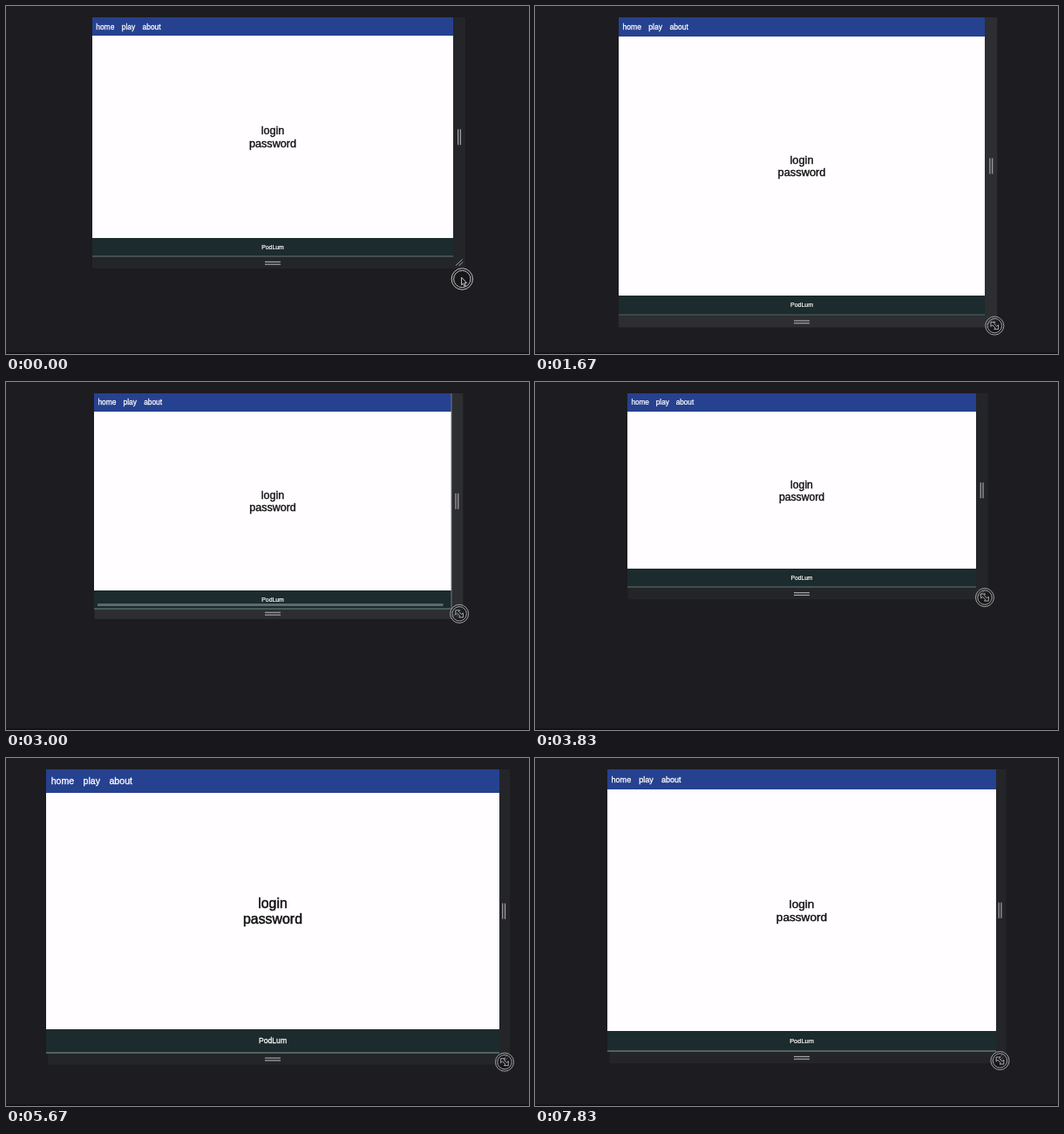
An HTML page with a canvas that plays this animation: 600x399 px, repeating every 8 s.

```html
<!DOCTYPE html>
<html lang="en">
<head>
<meta charset="utf-8">
<title>Responsive layout</title>
<style>
  html, body { margin: 0; width: 100%; height: 100%; overflow: hidden; background: #1d1c20; }
  canvas { display: block; }
</style>
</head>
<body>
<canvas id="stage" width="600" height="399"></canvas>
<script>
const ctx = document.getElementById('stage').getContext('2d');

const LOOP = 8000;
const STEP = 1000 / 6;
const CENTER = 306;
const TOP = 13;
const BAR = 14;
const FRAME_LEAD = 0.15;   // the frame and the pointer run ahead of the page, in steps
const POINTER_LEAD = 0.36;

const swing = p => (1 - Math.cos(Math.PI * p)) / 2;
const snap = p => 1 - (1 - p) ** 3;

// Turning points of the drag: [step, value, easing towards it]
const WIDTH = [
  [8.5, 414], [12.5, 432], [21.4, 399], [28.4, 401], [32, 528, snap],
  [33.1, 528], [38.2, 412], [44, 516], [49.3, 400]
];
const BOTTOM = [[4, 287], [11, 357], [21, 235], [23, 235], [28.6, 338], [48, 336]];

function follow(track, step) {
  const i = track.findIndex(k => k[0] > step);
  if (i === 0) return track[0][1];
  if (i < 0) return track[track.length - 1][1];
  const [s0, v0] = track[i - 1];
  const [s1, v1, ease = swing] = track[i];
  return v0 + (v1 - v0) * ease((step - s0) / (s1 - s0));
}

function sizeAt(step) {
  const width = follow(WIDTH, step);
  return { width, left: CENTER - width / 2, right: CENTER + width / 2, bottom: follow(BOTTOM, step) };
}

function box(x0, y0, x1, y1, color) {
  ctx.fillStyle = color;
  ctx.fillRect(x0, y0, x1 - x0, y1 - y0);
}

function line(x0, y0, x1, y1, color, weight = 1) {
  ctx.strokeStyle = color;
  ctx.lineWidth = weight;
  ctx.beginPath();
  ctx.moveTo(x0, y0);
  ctx.lineTo(x1, y1);
  ctx.stroke();
}

// A hairline stroke gives the text its slightly heavier rendering.
function text(str, x, middle, size, color, align = 'center') {
  ctx.font = `${size}px "Liberation Sans", Arial, sans-serif`;
  ctx.textAlign = align;
  ctx.fillStyle = ctx.strokeStyle = color;
  ctx.lineWidth = size * 0.03;
  const y = middle + size * 0.3465;
  ctx.fillText(str, x, y);
  ctx.strokeText(str, x, y);
  return ctx.measureText(str).width;
}

function shape(points, fill, stroke) {
  ctx.beginPath();
  points.forEach(([x, y]) => ctx.lineTo(x, y));
  ctx.closePath();
  ctx.fillStyle = fill;
  ctx.fill();
  ctx.strokeStyle = stroke;
  ctx.lineWidth = 0.9;
  ctx.stroke();
}

function drawFrame(frame, page, bright) {
  const right = frame.right + BAR;
  const bottom = frame.bottom + BAR;
  const color = bright ? '#2d2e32' : '#242528';
  const grip = '#a3a4a7';
  box(page.right, TOP, right, bottom, color);
  box(frame.left, page.bottom, right, bottom, color);

  const midY = (TOP + page.bottom) / 2 + 0.3;
  for (const d of [-1.4, 1.4]) {
    line(right - 7 + d, midY - 9, right - 7 + d, midY + 9, grip, 1.2);
    line(CENTER - 9, bottom - 6.2 + d, CENTER + 9, bottom - 6.2 + d, grip, 1.2);
  }
  line(right - 11, bottom - 3.5, right - 3.5, bottom - 10.5, grip);
  line(right - 7.5, bottom - 3, right - 3, bottom - 7.5, grip);
}

function drawPage(page, frame, step) {
  const { width } = page;
  const left = Math.round(page.left);
  const right = Math.round(page.right);
  const bottom = Math.round(page.bottom);
  const strip = width * 0.0515;
  const navBottom = Math.round(TOP + strip);
  const footTop = Math.round(page.bottom - strip);

  box(left, TOP, right, navBottom, '#26418f');
  box(left, navBottom, right, footTop, '#fffdff');
  box(left, footTop, right, bottom, '#1c2b2d');

  let x = page.left + width * 0.0102;
  for (const label of ['home', 'play', 'about']) {
    x += text(label, x, TOP + strip / 2, width * 0.0204, '#fff', 'left') + width * 0.0202;
  }

  const size = width * 0.0306;
  const middle = (TOP + page.bottom) / 2 + 0.3;
  text('login', CENTER, middle - size * 0.575, size, '#111');
  text('password', CENTER, middle + size * 0.575, size, '#111');
  text('PodLum', CENTER, page.bottom - strip / 2, width * 0.0167, '#fff');

  // the page edge shows while the frame is not growing
  const growth = frame.width - width;
  const alpha = Math.max(0, Math.min(0.75, 0.5 - growth * 0.15));
  line(left, bottom, right, bottom, `rgba(165,195,190,${alpha})`);

  if (step >= 17 && step <= 19) {
    line(left + 4, bottom - 4.5, right - 9.5, bottom - 4.5, '#5d6a6b', 2.8);
    line(right, TOP, right, bottom, '#77787c');
  }
}

function drawPointer(x, y, step) {
  const held = step >= 4;
  const radii = held ? [10.5, 8.2] : [12.2, 9.7];
  const ink = held ? '#bcbcbf' : '#dededf';
  ctx.save();
  ctx.translate(x, y);
  ctx.beginPath();
  ctx.arc(0, 0, radii[0], 0, Math.PI * 2);
  ctx.fillStyle = 'rgba(16,15,18,0.45)';
  ctx.fill();
  for (const r of radii) {
    ctx.beginPath();
    ctx.arc(0, 0, r, 0, Math.PI * 2);
    ctx.strokeStyle = ink;
    ctx.lineWidth = 0.85;
    ctx.stroke();
  }
  if (step < 3) {
    shape([[-0.7, -1.8], [-0.7, 6.8], [1.2, 5.2], [2.6, 8.2], [4, 7.5], [2.7, 4.6], [5.2, 4.4]], '#111', ink);
  } else {
    // two-headed resize arrow: one half, mirrored through the middle
    const half = [[-4.3, 1], [-4.3, -4], [0.5, -4], [-0.9, -2.5], [2.5, 0.8]];
    shape([...half, ...half.map(([px, py]) => [-px, -py])], '#111', ink);
  }
  ctx.restore();
}

function draw(ms) {
  const step = Math.floor((ms % LOOP + 3.5) / STEP) % 48;
  const page = sizeAt(step);
  const frame = sizeAt(step + FRAME_LEAD);
  const hand = sizeAt(step + POINTER_LEAD);
  const approach = 15 * Math.max(0, 1 - step / 4);

  box(0, 0, 600, 399, '#1d1c20');
  box(0, 397.5, 600, 399, '#110d11');
  drawFrame(frame, page, step >= 8 && step < 23);
  drawPage(page, frame, step);
  drawPointer(hand.right + 10.3, hand.bottom + 11 + approach, step);
}

const start = performance.now();
function tick() {
  draw(performance.now() - start);
  requestAnimationFrame(tick);
}
tick();
</script>
</body>
</html>
```
